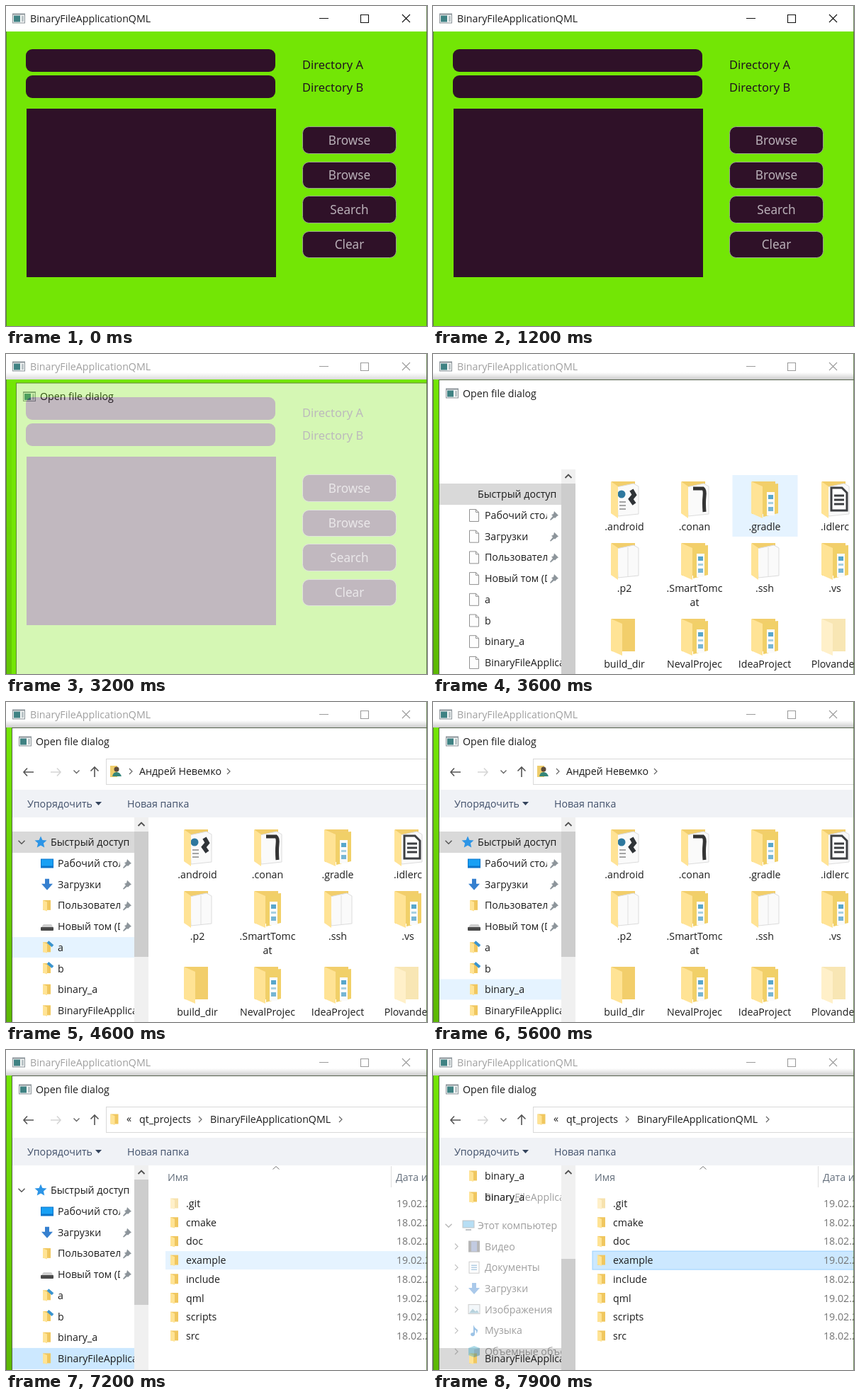
An HTML page for the animation above (8000 ms loop, 594 px wide and 452 px high).

```html
<!DOCTYPE html>
<html lang="ru">
<head>
<meta charset="utf-8">
<title>BinaryFileApplicationQML</title>
<style>
  html, body { margin: 0; width: 100%; height: 100%; overflow: hidden; background: #73e605; }
  svg { display: block; width: 100vw; height: 100vh; }
  text { font: 14.2px "Open Sans", "Noto Sans", sans-serif; fill: #1c1c1c; white-space: pre; }
  .form text { font: 16.5px "Noto Sans", sans-serif; fill: #20151f; }
  .form .button { font-size: 17.2px; fill: #b9b0b8; text-anchor: middle; }
  .mid { text-anchor: middle; }
</style>
</head>
<body>
<svg id="stage" viewBox="0 0 594 452" preserveAspectRatio="none"></svg>
<script>
const LOOP = 8000, STEP = 100;
const DARK = '#2f1128', HOVER = '#e5f3ff', SELECTED = '#cce8ff', GREY = '#d9d9d9';

// Markup helpers
const rect = (x, y, w, h, fill, more = '') => `<rect x="${x}" y="${y}" width="${w}" height="${h}" fill="${fill}" ${more}/>`;
const text = (x, y, s, more = '') => `<text x="${x}" y="${y + 5}" ${more}>${s}</text>`;
const fillPath = (d, fill, more = '') => `<path d="${d}" fill="${fill}" ${more}/>`;
const line = (d, color, width = 1) => `<path d="${d}" fill="none" stroke="${color}" stroke-width="${width}"/>`;
const at = (x, y, body) => `<g transform="translate(${x} ${y})">${body}</g>`;
const layer = (id, body, more = '') => `<g id="${id}" ${more}>${body}</g>`;
const right = (x, y, color = '#666') => line(`M${x - 2} ${y - 4}l4 4l-4 4`, color, 1.2);
const down = (x, y, color = '#555', r = 4.5) => line(`M${x - r} ${y - r / 2}l${r} ${r}l${r} ${-r}`, color, 1.4);
const up = (x, y) => line(`M${x - 4.5} ${y + 2}l4.5 -4.5l4.5 4.5`, '#505050', 1.8);

// Small icons, centred on the origin
const folder = rect(-6, -7.5, 11, 14, '#f0c75f') + fillPath('M-6 -7.5L0 -5V8L-6 6Z', '#ffe394');
const icons = {
  app: rect(-9, -6.5, 18, 14, '#8b9499') + rect(-8, -4.5, 16, 11, '#f4f6f6') + rect(-7, -3.5, 9, 9, '#3f8283') + rect(4, -3, 3, 8, '#b9c3c6'),
  page: fillPath('M-6.5 -8.5H2.5L6.5 -4.5V8.5H-6.5Z', '#fdfdfd', 'stroke="#909090"') + line('M2.5 -8.5V-4.5H6.5', '#909090'),
  folder,
  shared: folder + line('M1 -8L8 -2', '#3a94cf', 4),
  star: fillPath('M0 -8.5L2.4 -2.9L8.5 -2.4L3.9 1.6L5.3 7.6L0 4.4L-5.3 7.6L-3.9 1.6L-8.5 -2.4L-2.4 -2.9Z', '#2d95e6'),
  desktop: rect(-9, -6.5, 18, 13, '#0b74ca') + rect(-8, -5.5, 16, 9, '#18a0f4'),
  load: fillPath('M-3 -8H3V-1H8L0 8L-8 -1H-3Z', '#3680cf'),
  drive: fillPath('M-5 -3H6L9 2H-9Z', '#cfcfcf') + rect(-9, 1, 18, 5, '#4a4a4a', 'rx="1"'),
  computer: rect(-8, -7, 16, 10, '#55b1e5', 'stroke="#68737a"') + rect(-4, 5, 8, 2, '#68737a'),
  video: rect(-8, -8, 16, 16, '#555') + rect(-4, -7, 8, 14, '#6f86ba'),
  docs: rect(-7, -8, 14, 16, '#fff', 'stroke="#888"') + line('M-4 -3H4M-4 0H4M-4 3H4', '#4889bd', 1.5),
  image: rect(-8, -7, 16, 13, '#e3eef5', 'stroke="#888"') + fillPath('M-7 5L-2 -1L2 3L4 1L7 5Z', '#5595b0'),
  music: fillPath('M-1 -8Q1 -3 5 -1Q5 3 3 4Q4 0 1 -1V5A3 2.5 0 1 1 -1 3Z', '#1673c4'),
  cube: fillPath('M0 -8L8 -5V5L0 8L-8 5V-5Z', '#3ca8c8') + fillPath('M0 -3L8 -5V5L0 8Z', '#257a9d'),
  user: rect(-8, -8, 10, 16, '#efcd6b') + '<circle cx="1" cy="-3" r="3.5" fill="#5c4a3b"/>' + fillPath('M-5 7Q-4 1 1 1T8 7Z', '#35877a')
};
const icon = (name, x, y) => at(x, y, icons[name]);
const pin = y => at(171, y, fillPath('M0 -6L6 0L4 1L1 4L0 3L-5 7L-6 6L-2 1L-4 -1L-1 -2Z', '#8d959b'));

// Folder tiles
const paper = fillPath('M9 9L33 4L40 8V47L11 50Z', '#fafafa', 'stroke="#dcdcdc"');
const contents = {
  gear: paper + '<circle cx="16" cy="19" r="5.5" fill="#2e789e"/>' + line('M30 13L34 20L29 26L34 33', '#303438', 6) +
    line('M13 30h9M13 35h9M13 40h9', '#888', 1.5),
  curve: paper + line('M18 11H32Q35 13 34 22T34 44', '#333', 5),
  blue: fillPath('M18 6L39 4V46L18 51Z', '#f1d068') + rect(23, 16, 11, 33, '#fafafa') + rect(25, 20, 7, 6, '#58a7cc') +
    rect(25, 30, 7, 3, '#a7d0e3') + rect(25, 37, 7, 6, '#77b6d5'),
  sheet: paper + fillPath('M15 10H30L37 17V42H15Z', '#fff', 'stroke="#3d3f42" stroke-width="3"') +
    line('M19 21H33M19 27H33M19 33H33', '#3d3f42', 3),
  white: paper + line('M25 7V48', '#e0e0e0'),
  none: ''
};
const bigFolder = kind => {
  const flap = contents[kind].startsWith(paper) ? 11 : 17;
  return fillPath('M2 1H35V47H2Z', '#f2ce6b') + contents[kind] + fillPath(`M1 1L${flap} 8V53L1 46Z`, '#ffe395');
};
const tiles = [
  ['.android', 'gear'], ['.conan', 'curve'], ['.gradle', 'blue'], ['.idlerc', 'sheet'],
  ['.p2', 'white'], ['.SmartTomc|at', 'blue'], ['.ssh', 'white'], ['.vs', 'blue'],
  ['build_dir', 'none'], ['NevalProjec', 'blue'], ['IdeaProject', 'blue'], ['Plovander', 'none']
];
const tileX = i => 270 + 99 * (i % 4);
const tileTop = i => [179, 266, 373][i >> 2];
const tile = ([name, kind], i) => at(tileX(i) - 20, tileTop(i), `<g opacity="${i === 11 ? .5 : 1}">${bigFolder(kind)}</g>`) +
  name.split('|').map((s, k) => text(tileX(i), tileTop(i) + 65 + 20 * k, s, 'class="mid"')).join('');

// Navigation pane
const places = [
  ['Рабочий стол', 'desktop', 1], ['Загрузки', 'load', 1], ['Пользователи', 'folder', 1], ['Новый том (D:)', 'drive', 1],
  ['a', 'shared'], ['b', 'shared'], ['binary_a', 'folder'], ['BinaryFileApplicationQML', 'folder']
];
const placeY = i => 228 + 29.7 * i;
const placeLabels = places.map(([name, , pinned], i) =>
  text(73, placeY(i), name, `clip-path="url(#${pinned ? 'pinnedClip' : 'paneClip'})"`) + (pinned ? pin(placeY(i)) : '')).join('');
const placeIcons = kind => places.map((p, i) => icon(kind || p[1], 58, placeY(i))).join('');
const devices = [['Видео', 'video'], ['Документы', 'docs'], ['Загрузки', 'load'], ['Изображения', 'image'], ['Музыка', 'music'], ['Объемные объекты', 'cube']];
const scrolledTree = rect(9, 163, 172, 289, '#fff') + rect(9, 421, 172, 30, GREY) +
  [178, 208].map(y => icon('folder', 57, y) + text(73, y, 'binary_a')).join('') +
  icon('folder', 57, 436) + text(73, 436, places[7][0]) +
  layer('ghost', text(73, 208, places[7][0]) + down(22, 248) + icon('computer', 50, 248) + text(63, 248, 'Этот компьютер') +
    devices.map(([name, kind], i) => {
      const y = 277.5 + 29.7 * i;
      return right(33, y) + icon(kind, 58, y) + text(73, y, name);
    }).join(''));

// Detail list
const files = [['.git', 19], ['cmake', 18], ['doc', 18], ['example', 19], ['include', 18], ['qml', 19], ['scripts', 19], ['src', 18]];
const fileY = i => 217 + 26.7 * i;
const list = line('M376.5 168.5l4.5 -4l4.5 4', '#777') + line('M543.5 164V194', '#dedede') +
  text(228, 180, 'Имя', 'style="fill:#65707d"') + text(550, 180, 'Дата изменения', 'style="fill:#65707d"') +
  rect(225, 0, 380, 26, HOVER, 'id="fileMark"') +
  files.map(([name, day], i) => `<g opacity="${i ? 1 : .5}">${icon('folder', 238, fileY(i))}</g>` + text(254, fileY(i), name) +
    text(551, fileY(i), day + '.02.2021', 'style="fill:#747474"')).join('');

const arrow = (x, dir, color) => line(`M${x - 7} 99H${x + 7}M${x - dir * 2} 93.5L${x - dir * 7} 99L${x - dir * 2} 104.5`, color, 1.6);
const toolbar = arrow(32, 1, '#555') + arrow(70, -1, '#d5d5d5') + down(99.5, 98.5, '#666', 4) +
  line('M125 106V92M119.5 97.5L125 92L130.5 97.5', '#555', 1.6) +
  rect(141.5, 80.5, 480, 36, '#fff', 'stroke="#d9d9d9"') +
  layer('userPath', icon('user', 155, 98) + right(176, 98) + text(188, 98, 'Андрей Невемко') + right(314, 98)) +
  layer('projectPath', icon('folder', 153.5, 98) + text(170, 97, '«') + text(188, 98, 'qt_projects') + right(274, 98) +
    text(288, 98, 'BinaryFileApplicationQML') + right(472, 98)) +
  rect(9, 124, 600, 39, '#f0f2f6') + text(30, 144, 'Упорядочить', 'style="fill:#41506a"') +
  fillPath('M126 141H135L130.5 146Z', '#33435c') + text(171, 144, 'Новая папка', 'style="fill:#41506a"');

const tree = rect(9, 0, 172, 30, HOVER, 'id="selectMark"') + rect(9, 0, 172, 29, HOVER, 'id="hoverMark"') +
  rect(9, 183, 172, 30, GREY, 'id="rootMark"') + text(63, 198, 'Быстрый доступ') + placeLabels +
  layer('plainIcons', placeIcons('page')) +
  layer('realIcons', placeIcons() + icon('star', 49, 198) + down(22, 198));

const dialog = rect(8.5, 36.5, 620, 440, '#fff', 'stroke="#58644f"') + icon('app', 27, 55) + text(42, 55.5, 'Open file dialog') +
  layer('body', layer('tree', tree, 'clip-path="url(#paneClip)"') + layer('scrolledTree', scrolledTree, 'clip-path="url(#paneClip)"') +
    rect(181, 163, 20, 289, '#f0f0f0') + rect(181, 183, 20, 177, '#cdcdcd', 'id="thumb"') + up(191, 173) +
    layer('grid', rect(0, 0, 92, 87, HOVER, 'id="tileMark"') + tiles.map(tile).join('')) + layer('list', list)) +
  layer('toolbar', toolbar);

// Main window
const fields = [[28, 61, 352, 32, 9], [28, 98, 352, 32, 9], [29, 145, 352, 238, 0]];
const buttons = [['Browse', 170.5, 38], ['Browse', 220.5, 37], ['Search', 268.5, 38], ['Clear', 318.5, 37]];
const form = fields.map(([x, y, w, h, r]) => rect(x, y, w, h, DARK, `rx="${r}"`)).join('') +
  text(418, 83.5, 'Directory A') + text(418, 116, 'Directory B') +
  buttons.map(([name, y, h]) => rect(418.5, y, 132, h, DARK, 'rx="9" stroke="#9da58f"') +
    text(484.5, y + h / 2 + 1.2, name, 'class="button"')).join('');

document.getElementById('stage').innerHTML = `<defs>
  <clipPath id="paneClip"><rect x="9" y="163" width="172" height="289"/></clipPath>
  <clipPath id="pinnedClip"><rect x="9" y="163" width="152" height="289"/></clipPath>
  <linearGradient id="shade" x2="0" y2="1"><stop stop-opacity="0"/><stop offset="1" stop-opacity=".2"/></linearGradient></defs>` +
  rect(0, 0, 594, 452, '#73e605') + rect(0, 0, 594, 36, '#fff') + icon('app', 18, 17) +
  layer('caption', text(34, 18, 'BinaryFileApplicationQML') +
    line('M442 17.5H455M500.5 12.5H511.5V23.5H500.5ZM559 12L570 23M570 12L559 23', '#111', 1.1)) +
  layer('form', form, 'class="form"') +
  layer('shadow', rect(0, 26, 594, 10, 'url(#shade)') + rect(0, 36, 8, 416, 'url(#shade)')) +
  layer('dialog', dialog) + line('M593.5 0V452M.5 36V452', '#4f6f38', .8);

// Motion tables: [time, value...], each entry holds until the next
const opening = [[0, 0, 16, 13], [3100, .25, 12, 9], [3200, .7, 6, 4.5], [3300, .94, 2, 1.5], [3400, 1, 0, 0]];
const captionFade = [[0, 1], [2300, .65], [2400, .42]];
const tileHover = [[0, -1], [3500, 2], [4100, 1], [4200, 0], [4300, -1]];
const placeHover = [[0, -1], [4300, 3], [4500, 4], [4900, 5], [5400, 6], [5800, 7], [6500, 6], [6900, -1]];
const fileHover = [[0, -1], [7000, 4], [7200, 3]];
const thumbSpan = [[0, 183, 269], [3700, 183, 177], [7800, 295, 157]];

const node = id => document.getElementById(id);
const pick = (table, t) => table.filter(row => row[0] <= t).pop().slice(1);
const show = (id, on) => node(id).setAttribute('visibility', on ? 'inherit' : 'hidden');
const set = (id, attrs) => Object.entries(attrs).forEach(([k, v]) => node(id).setAttribute(k, v));

function render(t) {
  const [alpha, dx, dy] = pick(opening, t);
  set('dialog', { opacity: alpha, transform: `translate(${dx} ${dy})` });
  set('shadow', { opacity: alpha });
  set('caption', { opacity: pick(captionFade, t)[0] });

  const loaded = t >= 3700, opened = t >= 6300, chosen = t >= 7400, scrolled = t >= 7800;
  show('body', t >= 3500);
  show('toolbar', loaded);
  show('plainIcons', !loaded);
  show('realIcons', loaded);
  show('rootMark', !opened);
  show('userPath', !opened);
  show('projectPath', opened);
  show('grid', !opened);
  show('list', opened);
  set('tree', { display: scrolled ? 'none' : 'inline' });
  show('scrolledTree', scrolled);
  set('ghost', { opacity: t >= 7900 ? .42 : .2 });
  const [thumbY, thumbHeight] = pick(thumbSpan, t);
  set('thumb', { y: thumbY, height: thumbHeight });

  const [tileAt] = pick(tileHover, t), [placeAt] = pick(placeHover, t), [fileAt] = pick(fileHover, t);
  show('tileMark', tileAt >= 0);
  set('tileMark', { x: tileX(Math.max(tileAt, 0)) - 45.5, y: 171 });
  show('hoverMark', placeAt >= 0 && !(opened && placeAt === 7));
  set('hoverMark', { y: placeY(placeAt) - 14.7 });
  show('selectMark', opened);
  set('selectMark', { y: placeY(7) - 15, fill: chosen ? GREY : SELECTED });
  show('fileMark', fileAt >= 0);
  set('fileMark', { y: fileY(fileAt) - 13, fill: chosen ? SELECTED : HOVER, stroke: chosen ? '#99d1ff' : 'none' });
}

const start = performance.now();
function tick() {
  const t = (performance.now() - start) % LOOP;
  render(Math.floor(t / STEP) * STEP);
  requestAnimationFrame(tick);
}
tick();
</script>
</body>
</html>
```
